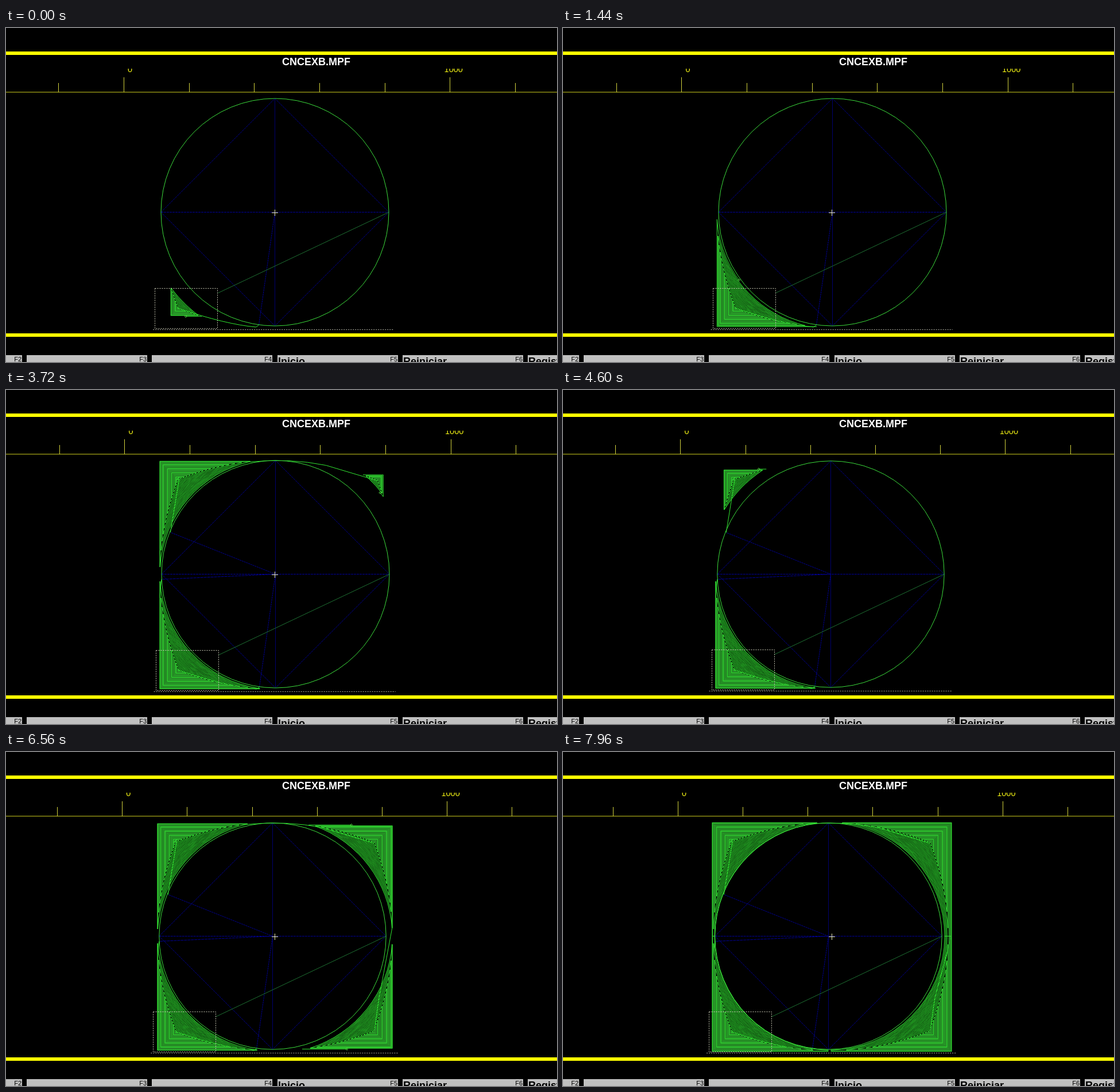
An HTML page with a canvas that plays this animation: 960x583 px, repeating every 8000 ms.

```html
<!DOCTYPE html>
<html lang="es">
<head>
<meta charset="utf-8">
<title>Simulación de mecanizado</title>
<style>
html, body { margin: 0; width: 100%; height: 100%; overflow: hidden; background: #000; }
canvas { display: block; width: 100vw; height: 100vh; }
</style>
</head>
<body>
<canvas id="stage" width="960" height="583"></canvas>
<script>
const ctx = document.getElementById('stage').getContext('2d');
const LOOP = 8, PASSES = 19, RADIUS = 198.5, CY = 321.5;
const REDRAW = 4.4, REDRAW_RATE = 50, FINISH = 7.62;
const REFITS = [1, REDRAW, 4.8, 6.3, 6.9, FINISH];
const SANS = '"Liberation Sans", Arial, sans-serif';
const GREEN = '#32e632', DIM = '#289628', YELLOW = '#ffff00';

// Times in seconds, rates in passes per second
const corners = {
  bl: { sx: -1, sy: 1, start: -0.97, rate: 7.36, redraw: 0 },
  tl: { sx: -1, sy: -1, start: 1.7, rate: 14.5, redraw: REDRAW },
  tr: { sx: 1, sy: -1, start: 3.4, rate: 14.5, redraw: 4.76 },
  br: { sx: 1, sy: 1, start: 4.98, rate: 14.5 }
};

function passesCut(c, t) {
  const again = t >= REDRAW && c.redraw !== undefined;
  const n = again ? (t - c.redraw) * REDRAW_RATE : (t - c.start) * c.rate;
  let cap = c.sx < 0 ? 18 : 15 + Math.max(0, t - 5.9) * 1.7;
  if (t >= FINISH) cap = PASSES;
  return Math.max(0, Math.min(n, cap));
}

// The view is fitted again each time the path outgrows it
function viewAt(t) {
  const n = REFITS.filter(time => time <= t).length;
  const x0 = n < 2 ? 205.3 + 1.4 * n : 204.8 - 1.12 * (n - 2);
  const span = n < 2 ? 568.5 : 566.1;
  const cx = x0 + 0.4625 * span;
  return { x0, span, cx, scale: span / 568.5, left: cx - 212, right: cx + 206 + 3 * n };
}

// A pass runs along both straight sides, then back on an arc
function passPoints({ sx, sy }, i) {
  const k = i / PASSES, r = 238.5 - 39 * k, dx = 2 + 2 * sx;
  const ax = 173 + 5 * sx + (36 + sx) * k, ay = 166 + 1.5 * sy + 34 * k;
  const u = ax - dx;
  const xSide = Math.sqrt(Math.max(0, r * r - ay * ay));
  const ySide = Math.sqrt(Math.max(0, r * r - u * u));
  const from = Math.atan2(ySide, u), to = Math.atan2(ay, xSide);
  const pts = [[xSide + dx, ay], [ax, ay], [ax, ySide]];
  for (let j = 0; j <= 16; j++) {
    const a = from + (to - from) * j / 16;
    pts.push([dx + r * Math.cos(a), r * Math.sin(a)]);
  }
  return pts.map(([x, y]) => [x * sx, y * sy]);
}

function trimmed(pts, f) {
  const lengths = pts.slice(1).map((p, i) => Math.hypot(p[0] - pts[i][0], p[1] - pts[i][1]));
  let left = f * lengths.reduce((a, b) => a + b);
  const out = [pts[0]];
  for (let i = 0; i < lengths.length; i++) {
    const q = lengths[i] ? Math.min(1, left / lengths[i]) : 1;
    out.push(pts[i].map((v, axis) => v + (pts[i + 1][axis] - v) * q));
    left -= lengths[i];
    if (left <= 0) break;
  }
  return out;
}

function line(pts, color, dash = [], width = 1) {
  ctx.strokeStyle = color;
  ctx.lineWidth = width;
  ctx.setLineDash(dash);
  ctx.beginPath();
  pts.forEach(p => ctx.lineTo(p[0], p[1]));
  ctx.stroke();
  ctx.setLineDash([]);
}

function curve(from, ctrl, to) {
  ctx.strokeStyle = GREEN;
  ctx.lineWidth = 1;
  ctx.beginPath();
  ctx.moveTo(...from);
  ctx.quadraticCurveTo(...ctrl, ...to);
  ctx.stroke();
}

function rect(x, y, w, h, color) {
  ctx.fillStyle = color;
  ctx.fillRect(x, y, w, h);
}

function text(s, x, y, font, color, align = 'left') {
  ctx.font = font + ' ' + SANS;
  ctx.fillStyle = color;
  ctx.textAlign = align;
  ctx.fillText(s, x, y);
}

function drawFrame() {
  rect(0, 41, 960, 6, YELLOW);
  rect(0, 533, 960, 6, YELLOW);
  text('CNCEXB.MPF', 481, 65, 'bold 18px', '#fff');
  ['', '', '', 'Inicio', 'Reiniciar', 'Registro'].forEach((label, i) => {
    const x = Math.round(36 + (i - 1) * 218.3);
    rect(x, 571, 210, 12, '#c0c0c0');
    text('F' + (i + 2), x + 209, 582, '11px', '#000', 'right');
    text(label, x + 1, 588, 'bold 18px', '#000');
  });
}

function drawRuler({ x0, span }) {
  rect(0, 111.5, 960, 1, '#d2d21e');
  for (let i = -1; i < 7; i++) {
    const top = i % 5 ? 96 : 86;
    rect(Math.floor(x0 + i * span / 5), top, 1, 112 - top, '#d2d23c');
  }
  ctx.save();
  ctx.beginPath();
  ctx.rect(0, 71, 960, 20);
  ctx.clip();
  text('0', x0 + 6.8, 77, '14.5px', '#f0f014');
  text('1000', x0 + span - 10.2, 77, '14.5px', '#f0f014');
  ctx.restore();
}

function drawGuides(t, cut) {
  const n = [0, -RADIUS], e = [RADIUS, 0], s = [0, RADIUS], w = [-RADIUS, 0], o = [0, 0];
  const blue = '#000096';
  line([w, n, e, s, w], blue, [4, 1]);
  line([n, s], '#00006e');
  line([w, e], blue, [4, 1]);
  line([o, [-28, 197]], blue, [3, 1]);
  if (cut.tl > 0) line([o, [-183, -73]], blue, t < 3 ? [10, 14] : [3, 1]);
  if (t > 3.3) line([o, [-RADIUS, 9]], blue, [5, 1]);
  line([e, [-99, 141]], '#1e6e32');
}

function drawLinks(cut) {
  line([[-28, 197], [-33, 200.5]], GREEN);
  curve([-33, 200.5], [-85, 196], [-168, 168]);
  if (cut.tl > 0) {
    line([[-201, 27], [-RADIUS, 9]], GREEN);
    line([[-183, -73], [-168, -165]], GREEN);
  }
  if (cut.tr > 0) {
    curve([-45, -196], [25, -203], [88, -190]);
    line([[88, -190], [178, -163]], GREEN);
  }
  if (cut.br > 0) {
    const end = passPoints(corners.tr, Math.floor(cut.tr))[2];
    line([end, [186, 109], [178, 167]], GREEN);
  }
}

function drawCorner(c, n) {
  if (n <= 0) return;
  const full = Math.floor(n), part = n - full;
  const loops = Array.from({ length: full + 1 }, (_, i) => passPoints(c, i));
  loops.forEach(pts => line(pts.slice(0, 3), DIM, [], 2));
  loops.forEach((pts, i) => {
    line(pts.slice(2), GREEN, [], 1.1);
    if (i % 4 === 3 || i === full) line(pts.slice(0, 3), GREEN);
  });
  if (part < 0.01) return;
  const pts = trimmed(passPoints(c, full + 1), part);
  line(pts, GREEN);
  const [x, y] = pts[pts.length - 1];
  line([[x - 2, y], [x, y - 2], [x + 2, y], [x, y + 2], [x - 2, y]], '#5adc46');
}

function drawBounds({ cx, scale, left, right }) {
  const snap = v => Math.floor(v) + 0.5;
  const x = snap(cx - 208.3 * scale), w = Math.round(109 * scale);
  const y = snap(CY - 0.5 + 133.5 * scale), bottom = snap(CY - 0.5 + 203.6 * scale);
  line([[x, y], [x + w, y], [x + w, bottom], [x, bottom], [x, y]], '#c8c8b4', [2, 2]);
  line([[left, bottom + 2], [right, bottom + 2]], '#b4b4a5', [2, 2]);
}

function draw(t) {
  rect(0, 0, 960, 583, '#000');
  const view = viewAt(t), cut = {};
  for (const id in corners) cut[id] = passesCut(corners[id], t);

  drawFrame();
  drawRuler(view);

  ctx.save();
  ctx.translate(Math.floor(view.cx) + 0.5, CY);
  ctx.scale(view.scale, view.scale);
  drawGuides(t, cut);
  drawLinks(cut);
  for (const id in corners) drawCorner(corners[id], cut[id]);
  ctx.strokeStyle = '#3cdc3c';
  ctx.lineWidth = 1;
  ctx.beginPath();
  ctx.arc(0, 0, RADIUS, 0, 7);
  ctx.stroke();
  ctx.restore();

  drawBounds(view);
  if (t < REDRAW || t >= 4.8) {
    rect(463, 322, 11, 1, '#e6e6aa');
    rect(468, 317, 1, 11, '#e6e6aa');
  }
}

const start = performance.now();
function tick() {
  draw((performance.now() - start) / 1000 % LOOP);
  requestAnimationFrame(tick);
}
tick();
</script>
</body>
</html>
```
